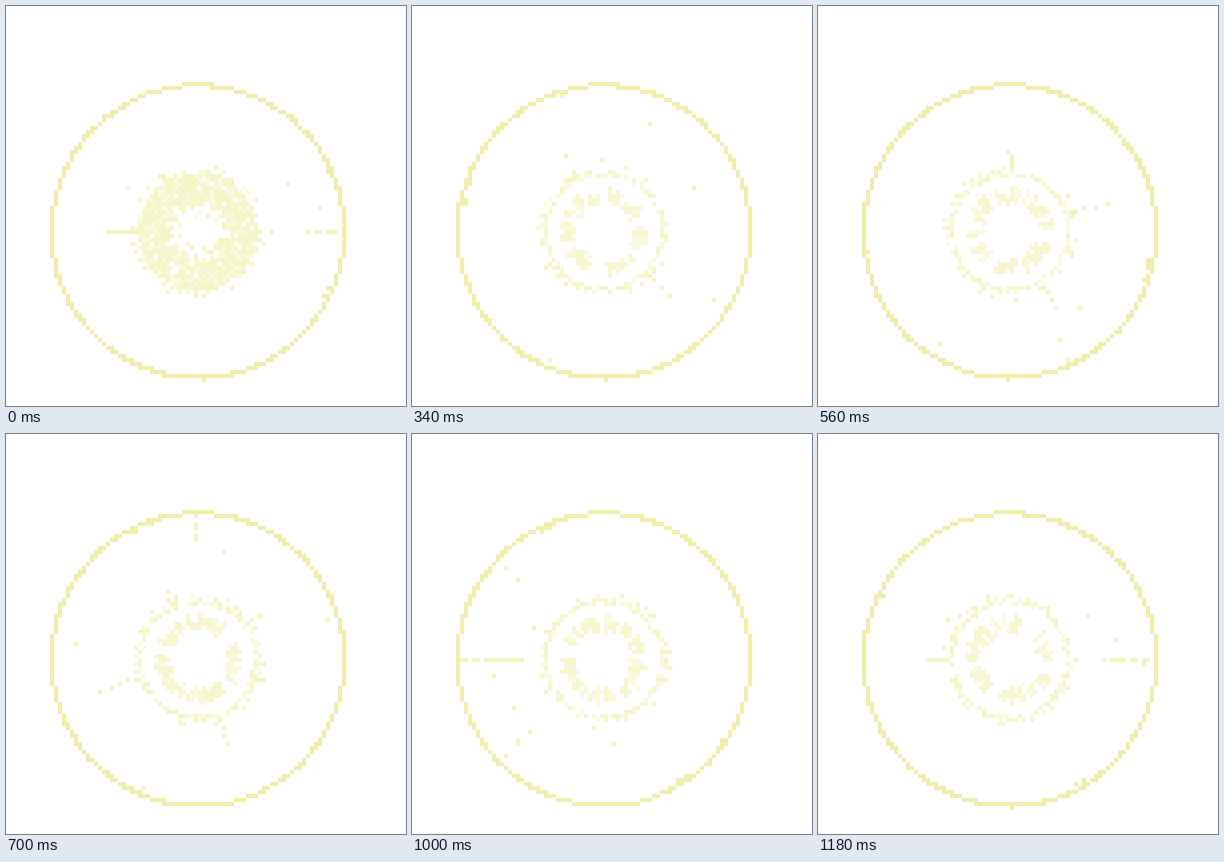
An HTML page that plays this animation: 400 by 400 pixels, repeating every 1.2 s.

```html
<!DOCTYPE html>
<html lang="en">
<head>
<meta charset="utf-8">
<title>Pixel sparks</title>
<style>
  html, body { margin: 0; width: 100%; height: 100%; overflow: hidden; background: #fff; }
  svg { display: block; width: 100vw; height: 100vh; }
</style>
</head>
<body>
<svg viewBox="0 0 100 100" shape-rendering="crispEdges">
  <path id="soft" fill="#faf9e0"/>
  <path id="dash" fill="#f7f6d0"/>
  <path id="core" fill="#f6f5c8"/>
  <path id="spark" fill="#f4f3bf"/>
  <path id="rim" fill="#f0eeaa"/>
</svg>
<script>
const LOOP = 1200, STEP = 20, FLIGHT = 160, TURN = Math.PI * 2;
const CX = 48, CY = 56.4, RIM = 36.6, CORE = 14.6;
const paths = {};
for (const p of document.querySelectorAll('path')) paths[p.id] = p;
let cells;

function rng(seed) {
  let s = seed * 7919 + 17;
  return () => {
    s = (s + 0x6D2B79F5) | 0;
    let v = Math.imul(s ^ (s >>> 15), 1 | s);
    v = (v + Math.imul(v ^ (v >>> 7), 61 | v)) ^ v;
    return ((v ^ (v >>> 14)) >>> 0) / 4294967296;
  };
}

const put = (layer, x, y) => { cells[layer].add(`M${x} ${y}h1v1h-1z`); };
const polar = (layer, a, r) =>
  put(layer, Math.floor(CX + r * Math.cos(a)), Math.floor(CY + r * Math.sin(a)));

// Each ray fires a few shots along one angle; rays on an axis fire densely.
function makeRays(count) {
  const rnd = rng(5);
  return Array.from({ length: count }, (_, i) => {
    const axial = rnd() < .08;
    const angle = rnd() * TURN;
    return {
      angle: axial ? Math.round(angle / TURN * 4) * TURN / 4 : angle,
      born: (i + rnd()) / count * LOOP,
      gap: axial ? 6 : STEP,
      shots: axial ? 14 : rnd() < .25 ? 4 + Math.floor(rnd() * 3) : 1
    };
  });
}
const rays = makeRays(70);

function drawSparks(t) {
  for (const { angle, born, gap, shots } of rays) {
    const age = (t - born + LOOP) % LOOP;
    for (let i = 0; i < shots; i++) {
      const u = (age - i * gap) / FLIGHT;
      if (u >= 0 && u < 1) polar('spark', angle, CORE + 1 + (RIM - CORE - 1) * u * u);
    }
  }
}

function drawRim(rnd) {
  const shift = rnd();
  for (let i = 0; i < 360; i++) polar('rim', (i + shift) / 360 * TURN, RIM);
  // Small dents where sparks land
  for (let i = 0; i < 3; i++) {
    const a = rnd() * TURN, n = 1 + Math.floor(rnd() * 3);
    for (let j = 0; j < n; j++) polar('rim', a + j / RIM, RIM - 1);
  }
  if (rnd() < .8) polar('rim', TURN / 4 + (rnd() - .5) * .06, RIM + .6);
}

function drawCore(rnd) {
  for (let i = 0; i < 120; i++) {
    const a = i / 120 * TURN;
    if (rnd() < .8) polar(rnd() < .5 ? 'core' : 'soft', a, CORE - .4 + rnd() * .6);
  }
  for (let i = 0; i < 48; i++) {
    const a = (i + rnd() * .6) / 48 * TURN;
    if (rnd() < .6) polar(rnd() < .55 ? 'core' : 'soft', a, CORE + .9);
    if (rnd() < .22) polar('core', a, CORE + 1.8);
  }
}

function drawDashes(rnd) {
  const phase = rnd() * TURN, lobes = 5 + Math.floor(rnd() * 4);
  for (let i = 0; i < 56; i++) {
    const a = i / 56 * TURN;
    if (rnd() > .72 + .28 * Math.sin(a * lobes + phase)) continue;
    const from = 6.8 + rnd() * 2.2, to = Math.min(11, from + 1.5 + rnd() * 3);
    const layer = rnd() < .65 ? 'dash' : 'soft';
    for (let r = from; r <= to; r += .6) polar(layer, a, r);
  }
}

// Dense disc at the start of the loop, thinning out quickly
function drawDisc(t, rnd) {
  const keep = 1 - t / 60;
  if (keep <= 0) return;
  for (let y = 41; y < 72; y++) {
    for (let x = 33; x < 63; x++) {
      const r = Math.hypot(x + .5 - CX, y + .5 - CY);
      if (r > CORE) continue;
      const fill = r > 10.5 ? .95 : Math.max(0, (r - 3.5) / 8.5);
      if (rnd() < fill * keep) put(rnd() < .65 ? 'core' : 'soft', x, y);
    }
  }
}

function draw(ms) {
  const frame = Math.floor((ms % LOOP) / STEP), t = frame * STEP;
  const rnd = rng(frame + 1);
  cells = {};
  for (const id in paths) cells[id] = new Set();
  drawRim(rnd);
  drawCore(rnd);
  drawDashes(rnd);
  drawDisc(t, rnd);
  drawSparks(t);
  for (const id in paths) paths[id].setAttribute('d', [...cells[id]].join(''));
}

let start;
function tick(now) {
  start ??= now;
  draw(now - start);
  requestAnimationFrame(tick);
}
draw(0);
requestAnimationFrame(tick);
</script>
</body>
</html>
```
